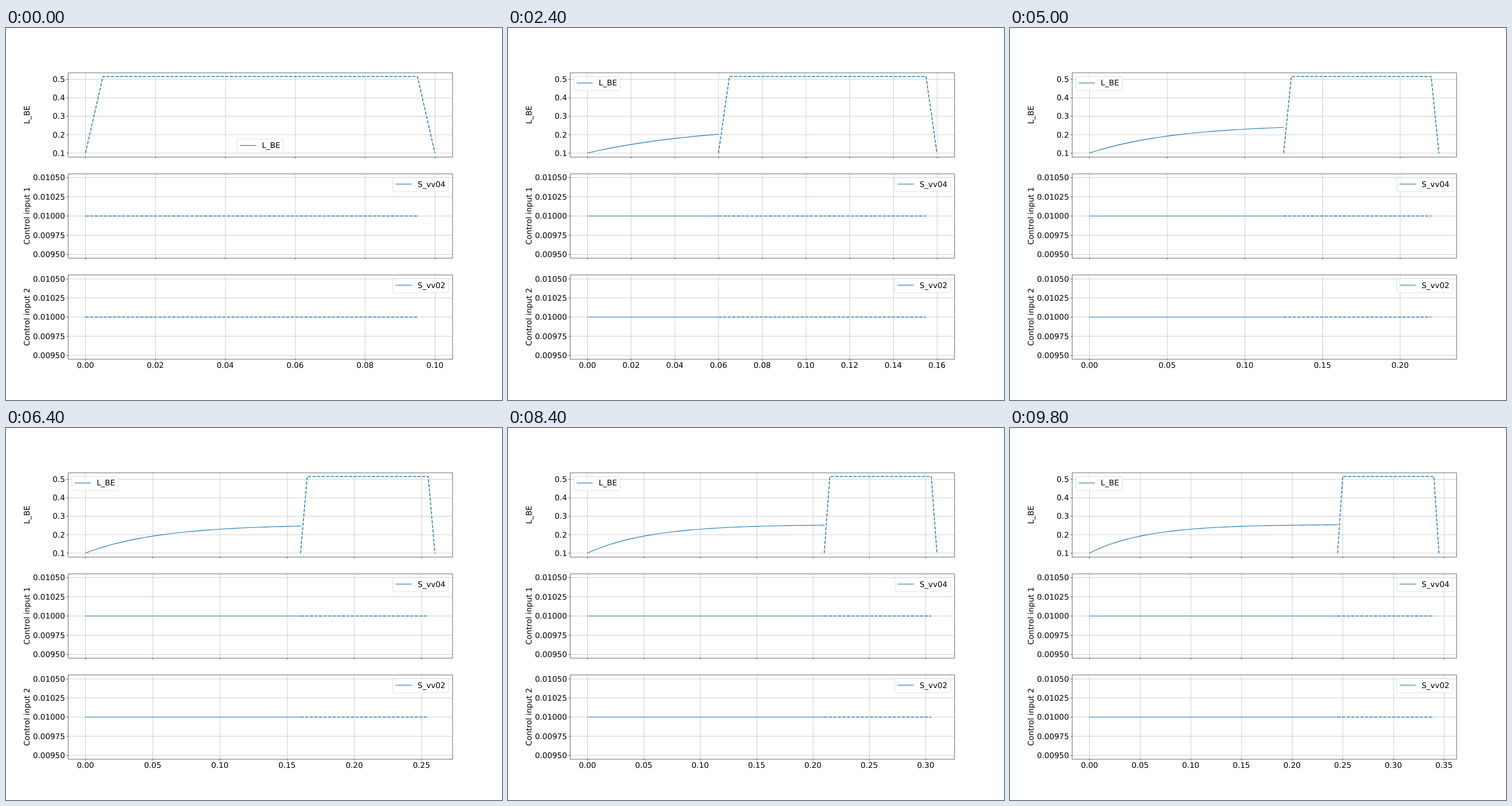
An HTML page for the animation above (10000 ms loop, 864x648 px).

```html
<!DOCTYPE html>
<html lang="en">
<head>
<meta charset="utf-8">
<title>Control plot</title>
<style>
  html, body { margin: 0; width: 100%; height: 100%; overflow: hidden; background: #fff; }
  svg { display: block; width: 864px; height: 648px; }
  text { font: 13.5px "DejaVu Sans", sans-serif; text-rendering: geometricPrecision; }
  path { fill: none; }
  .grid { stroke: #b0b0b0; stroke-width: .6; }
  .tick, .frame { stroke: #000; stroke-width: .6; }
  .line { stroke: #1f77b4; stroke-width: 1.125; stroke-linecap: square; stroke-linejoin: round; }
  .plan { stroke: #1f77b4; stroke-width: 1.5; stroke-dasharray: 5.55 2.4; stroke-linejoin: round; }
  .legend { fill: #fff; fill-opacity: .8; stroke: #ccc; stroke-opacity: .8; stroke-width: .75; }
  .end { text-anchor: end; }
  .mid { text-anchor: middle; }
</style>
</head>
<body>
<svg id="plot" viewBox="0 0 864 648"></svg>
<script>
const LEFT = 108, RIGHT = 777.6, HEIGHT = 146.75;
const X0 = LEFT + (RIGHT - LEFT) / 22, SPAN = (RIGHT - LEFT) / 1.1;
const STEP_MS = 200, STEPS = 50, DT = 0.005, HORIZON = 0.1;
const LOW = 0.1, HIGH = 0.5143;

const control = (top, label, legend) => ({
  top, label, legend, legendWidth: 97.1, min: 0.00945, max: 0.01055,
  ticks: [0.0095, 0.00975, 0.01, 0.01025, 0.0105], digits: 5,
  state: () => 0.01,
  plan: now => [[now, 0.01], [now + HORIZON - DT, 0.01]]
});

const pad = (HIGH - LOW) / 20;
const panels = [
  {
    top: 77.76, label: "L_BE", legend: "L_BE", legendWidth: 80.7,
    min: LOW - pad, max: HIGH + pad, ticks: [0.1, 0.2, 0.3, 0.4, 0.5], digits: 1,
    state: t => LOW + 0.155 * (1 - Math.exp(-t / 0.0559)),
    plan: now => [[now, LOW], [now + DT, HIGH], [now + HORIZON - DT, HIGH], [now + HORIZON, LOW]]
  },
  control(253.86, "Control input 1", "S_vv04"),
  control(429.96, "Control input 2", "S_vv02")
];

// Straight rules sit on a pixel grid finer than the stage.
const snap = v => (Math.round(v / 0.54) + 0.5) * 0.54;
const path = (cls, points) =>
  `<path class="${cls}" d="M${points.map(p => p.map(v => v.toFixed(2)).join(" ")).join("L")}"/>`;
const text = (cls, x, y, value, extra = "") =>
  `<text class="${cls}" x="${x}" y="${y}" ${extra}>${value}</text>`;

function drawLegend(panel, index, step) {
  const w = panel.legendWidth;
  let x = RIGHT - 6.75 - w, y = panel.top + 6.75;
  if (index === 0) {
    const blocked = step < 2;
    x = blocked ? (LEFT + RIGHT - w) / 2 : LEFT + 6.75;
    if (blocked) y = panel.top + HEIGHT - 6.75 - 24.5;
  }
  return `<rect class="legend" x="${x}" y="${y}" width="${w}" height="24.5" rx="2.7"/>`
    + path("line", [[x + 5.4, y + 11.3], [x + 32.4, y + 11.3]])
    + text("", x + 43.2, y + 15.9, panel.legend);
}

function drawPanel(panel, index, step, xTicks, xDigits) {
  const now = step * DT, end = now + HORIZON;
  const { top } = panel, bottom = top + HEIGHT;
  const px = t => X0 + SPAN * t / end;
  const py = v => bottom - HEIGHT * (v - panel.min) / (panel.max - panel.min);
  const flat = index > 0;
  const place = ([t, v]) => [px(t), flat ? snap(py(v)) : py(v)];
  let grid = "", marks = "", labels = "";

  for (const t of xTicks) {
    const x = snap(px(t));
    grid += path("grid", [[x, top], [x, bottom]]);
    marks += path("tick", [[x, bottom], [x, bottom + 2.7]]);
    if (index === 2) labels += text("mid", px(t), 592.2, t.toFixed(xDigits));
  }
  for (const v of panel.ticks) {
    const y = snap(py(v));
    grid += path("grid", [[LEFT, y], [RIGHT, y]]);
    marks += path("tick", [[LEFT - 2.6, y], [LEFT, y]]);
    labels += text("end", 102.75, py(v) + 4.95, v.toFixed(panel.digits));
  }

  const past = Array.from({ length: step + 1 }, (_, i) => place([i * DT, panel.state(i * DT)]));
  const lines = (step ? path("line", past) : "") + path("plan", panel.plan(now).map(place));

  const l = snap(LEFT), r = snap(RIGHT), t = snap(top), b = snap(bottom);
  const frame = `<path class="frame" d="M${l} ${t}H${r}V${b}H${l}Z"/>`;
  const middle = top + HEIGHT / 2;
  const title = text("mid", 0, 0, panel.label, `transform="translate(41.1 ${middle}) rotate(-90)"`);
  return grid + marks + lines + frame + labels + title + drawLegend(panel, index, step);
}

function draw(step) {
  const end = step * DT + HORIZON;
  const gap = [0.02, 0.025, 0.05].find(g => g >= end * 1.1 / 9);
  const count = Math.floor(end * 1.05 / gap + 1e-9) + 1;
  const xTicks = Array.from({ length: count }, (_, i) => i * gap);
  const xDigits = gap === 0.025 ? 3 : 2;
  document.getElementById("plot").innerHTML =
    panels.map((panel, i) => drawPanel(panel, i, step, xTicks, xDigits)).join("");
}

const start = performance.now();
let shown = -1;
function tick() {
  const step = Math.floor((performance.now() - start) / STEP_MS) % STEPS;
  if (step !== shown) draw(shown = step);
  requestAnimationFrame(tick);
}
tick();
</script>
</body>
</html>
```
